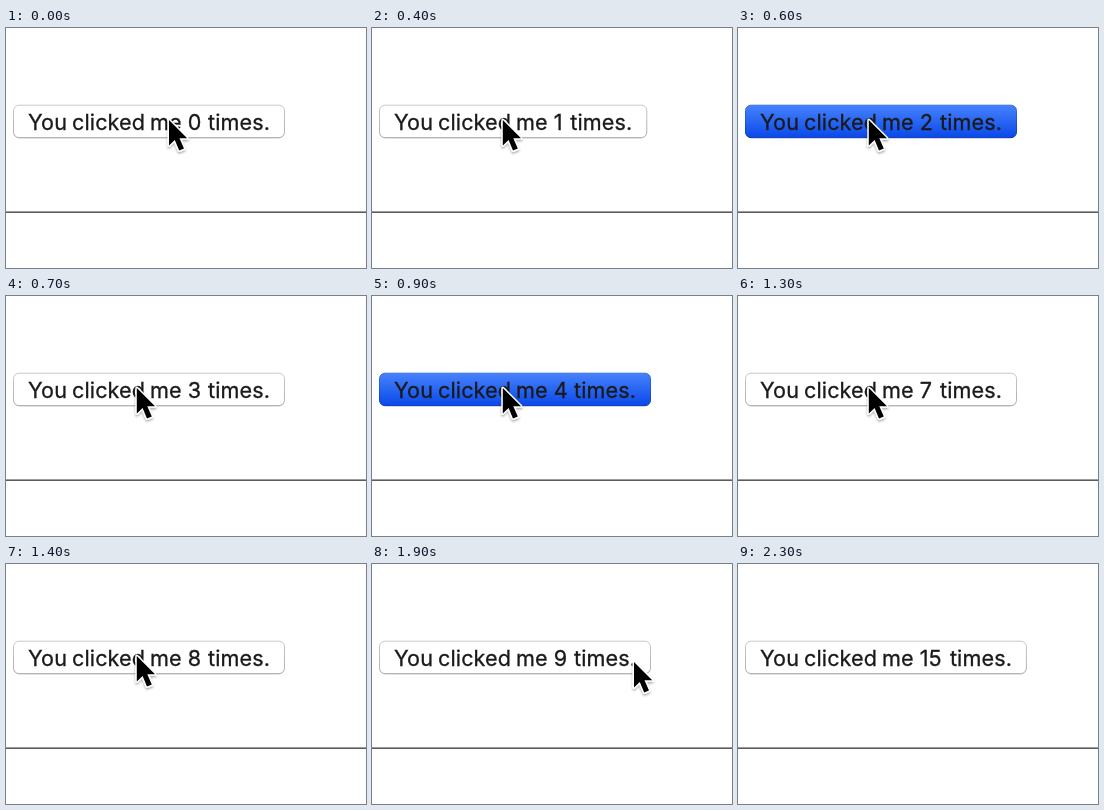
These frames come from a looping animation (360 by 240 pixels, 2400 ms). An HTML page:

```html
<!DOCTYPE html>
<html lang="en">
<head>
<meta charset="utf-8">
<title>Click counter</title>
<style>
  html, body { margin: 0; width: 100%; height: 100%; overflow: hidden; background: #fff; }
  svg { display: block; width: 360px; height: 240px; }
  text {
    font: 21.6px Inter, "Open Sans", sans-serif;
    letter-spacing: .12px;
    fill: #1a1a1a; stroke: #1a1a1a; stroke-width: .3px;
  }
</style>
</head>
<body>
<svg viewBox="0 0 360 240">
  <defs>
    <linearGradient id="pressed" x1="0" y1="0" x2="0" y2="1">
      <stop offset="0" stop-color="#4682fb"/>
      <stop offset="1" stop-color="#0a49ea"/>
    </linearGradient>
    <linearGradient id="rim" x1="0" y1="0" x2="0" y2="1">
      <stop offset="0" stop-color="#c8c8c8"/>
      <stop offset="1" stop-color="#b0b0b0"/>
    </linearGradient>
    <linearGradient id="pressedRim" x1="0" y1="0" x2="0" y2="1">
      <stop offset="0" stop-color="#3a6fe0"/>
      <stop offset="1" stop-color="#083bbb"/>
    </linearGradient>
    <filter id="shadow" x="-50%" y="-50%" width="200%" height="200%">
      <feDropShadow dx="0" dy="1.5" stdDeviation="1.3" flood-opacity=".35"/>
    </filter>
  </defs>
  <rect y="183.4" width="360" height="1.6" fill="#5c5c5c"/>
  <rect id="edge" x="7.5" y="78.2" height="32.4" rx="6" fill="#000" opacity=".2"/>
  <rect id="button" x="7.5" y="77.2" height="32.4" rx="5.5"/>
  <text x="22" y="102">You</text>
  <text x="66" y="102">clicked</text>
  <text x="144" y="102">me</text>
  <text id="count" x="181.8" y="102"></text>
  <text id="times" y="102">times.</text>
  <path id="cursor" d="M0 0V25.5L5.8 20L10.2 30.5L15 28.5L10.5 18.3H18.2Z"
        fill="#000" stroke="#fff" stroke-width="3" paint-order="stroke"
        stroke-linejoin="round" filter="url(#shadow)"/>
</svg>
<script>
  const STEP = 100, LOOP = 2400;
  const $ = id => document.getElementById(id);
  const set = (id, attrs) => {
    for (const name in attrs) $(id).setAttribute(name, attrs[name]);
  };

  // One entry per step; "*" marks a pressed button.
  const clicks = "0 0 0 0* 1 2 2* 3 3* 4* 5 6 6* 7 8 8* 9 9 9 9 10 12 13 15".split(" ");

  const HIDE_AT = 2000;
  const path = [[0, 163, 92], [100, 163, 92], [300, 130.8, 92], [1600, 130.8, 92], [1900, 262, 98], [LOOP, 262, 98]];

  function cursorAt(t) {
    const i = path.findIndex(p => p[0] > t);
    const [t0, x0, y0] = path[i - 1], [t1, x1, y1] = path[i];
    const k = (t - t0) / (t1 - t0), e = k * k * (3 - 2 * k);
    return [x0 + (x1 - x0) * e, y0 + (y1 - y0) * e];
  }

  // Digits are proportional: a 1 is narrower than the others.
  const DIGIT = 13.6, ONE = 9.9;
  const digitsWidth = n => [...String(n)].reduce((sum, d) => sum + (d === "1" ? ONE : DIGIT), 0);

  function render(now) {
    const step = Math.floor((now % LOOP) / STEP), t = step * STEP;
    const pressed = clicks[step].endsWith("*");
    const count = parseInt(clicks[step], 10);
    const extra = digitsWidth(count) - DIGIT;
    const width = 271 + extra;

    set("edge", { width });
    set("button", {
      width,
      fill: pressed ? "url(#pressed)" : "#fff",
      stroke: pressed ? "url(#pressedRim)" : "url(#rim)"
    });
    $("count").textContent = count;
    set("times", { x: 202 + extra });
    set("cursor", {
      transform: `translate(${cursorAt(t)})`,
      visibility: t < HIDE_AT ? "visible" : "hidden"
    });
  }

  const start = performance.now();
  function tick() {
    render(performance.now() - start);
    requestAnimationFrame(tick);
  }
  tick();
</script>
</body>
</html>
```
